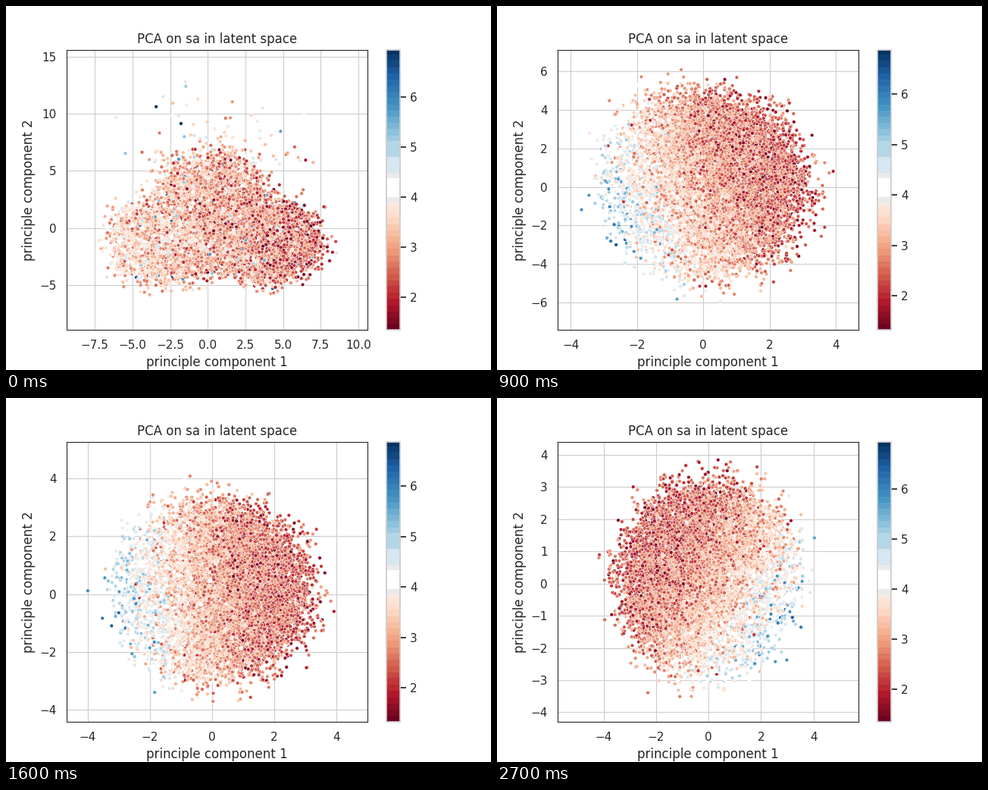
Write a matplotlib script that moves like this. It is 640 px wide and 480 px high and loops after 2.8 s.

```python
import numpy as np
import matplotlib.pyplot as plt
from matplotlib.animation import FuncAnimation
from matplotlib.colors import ListedColormap

FRAMES, INTERVAL = 28, 100
POINTS = 10000
INK = "0.15"

plt.rcParams.update({
    "font.family": "DejaVu Sans",
    "axes.edgecolor": "0.8",
    "axes.linewidth": 1.25,
    "axes.axisbelow": True,
    "axes.labelsize": 12,
    "axes.titlesize": 12,
    "axes.labelcolor": INK,
    "text.color": INK,
    "xtick.color": INK,
    "ytick.color": INK,
    "xtick.labelsize": 11,
    "ytick.labelsize": 11,
    "xtick.major.size": 6,
    "ytick.major.size": 6,
    "xtick.major.width": 1.25,
    "ytick.major.width": 1.25,
})

# Key views: x limits, y limits
LOBED = (-9.37, 10.60, -8.93, 15.62)
STRIP = (-23.56, 23.54, -26.28, 27.48)
ROUND = (-4.39, 4.67, -7.42, 7.12)
VIEWS = {
    0: LOBED, 2: ROUND, 5: STRIP, 9: ROUND, 12: ROUND,
    16: (-4.67, 4.99, -4.43, 5.28),
    20: (-4.70, 5.01, -4.155, 4.40),
    24: (-5.43, 5.93, -4.55, 5.21),
    27: (-5.75, 5.71, -4.30, 4.41),
}
STRIP_AXES = np.array([(2.3, 3.2), (-18.5, 20.5)])


def banded_map():
    """Red-blue map in coarse bands with a wide white middle."""
    base = plt.get_cmap("RdBu")
    colors = []
    for t in (np.arange(512) + 0.5) / 512:
        if 0.474 <= t < 0.542:
            colors.append((1, 1, 1, 1))
        elif 0.452 <= t < 0.561:
            colors.append((0.925, 0.92, 0.915, 1))
        else:
            step = 0.056 if 0.561 <= t < 0.673 else 0.0222
            start = 0.561 if t >= 0.561 else 0
            colors.append(base(start + (np.floor((t - start) / step) + 0.5) * step))
    return ListedColormap(colors)


def disk(rng, n):
    r, phi = np.sqrt(rng.random(n)), rng.uniform(0, 2 * np.pi, n)
    return np.column_stack([r * np.cos(phi), r * np.sin(phi)])


def round_cloud(rng):
    """Unit disk with frayed edge; values fall along the first axis."""
    p = 0.84 * disk(rng, 2 * POINTS) + rng.normal(0, 0.14, (2 * POINTS, 2))
    keep = rng.random(len(p)) < np.exp(-1.9 * np.clip(-p[:, 0] - 0.35, 0, None))
    p = p[keep][:POINTS]
    a = p[:, 0]
    spread = 0.46 + 0.3 * np.clip(-a, 0, 1)
    return p, 2.95 - 1.4 * a + 0.75 * a**2 + spread * rng.normal(0, 1, POINTS)


def lobed_cloud(rng):
    """Merged lobes with stray points above."""
    centers = np.array([(-2.9, -1.2), (3.9, -1.1), (0.3, 2.8), (0.5, -1.0)])
    lobe = rng.choice(4, POINTS, p=[0.32, 0.32, 0.26, 0.10])
    p = centers[lobe] + 3.1 * disk(rng, POINTS) + rng.normal(0, 0.72, (POINTS, 2))
    value = 2.95 - 0.09 * p[:, 0] + rng.normal(0, 0.58, POINTS)
    tail = rng.random(POINTS) < 0.06
    value[tail] += rng.exponential(1.1, tail.sum())
    stray = rng.random(POINTS) < 0.014
    k = stray.sum()
    p[stray] = np.column_stack([rng.normal(0.5, 2.6, k),
                                5.5 + rng.exponential(1.8, k)])
    value[stray] += 0.7
    return p, value


def round_axes(i):
    """Slow turn of the round cloud while it settles in height."""
    t = max(i - 12, 0)
    u = min(t / 12, 1)
    turn = np.radians(20 - 57 * u * u * (3 - 2 * u))
    width, height = 3.3 + 0.02 * t, 3.2 + 1.9 * np.exp(-t / 1.3)
    c, s = np.cos(turn), np.sin(turn)
    return np.array([(c, s), (-s, c)]) * (width, height)


def view(i):
    return [np.interp(i, list(VIEWS), side) for side in zip(*VIEWS.values())]


def value_limits(i):
    dip = np.exp(-((i - 12.5) / 4) ** 2)
    return 1.345 - 0.04 * dip, 6.945 - 0.15 * dip


def signs(i):
    """Component signs switch abruptly between fits."""
    return (1 if 8 <= i < 23 else -1), (1 if 8 <= i < 26 else -1)


rng = np.random.default_rng(11)
disk_pos, disk_val = round_cloud(rng)
lobe_pos, lobe_val = lobed_cloud(rng)

fig, ax = plt.subplots(figsize=(6.4, 4.8), dpi=100, facecolor="white")
dots = ax.scatter(*disk_pos.T, c=disk_val, s=11.5, cmap=banded_map(),
                  edgecolors="white", linewidths=0.35, zorder=2)
ax.set_title("PCA on sa in latent space")
ax.set_xlabel("principle component 1")
ax.set_ylabel("principle component 2")
ax.grid(True, color="0.8", linewidth=0.8)
ax.tick_params(bottom=False, left=False)
for spine in ax.spines.values():
    spine.set(color=INK, linewidth=0.8)
fig.colorbar(dots, ax=ax)


def update(i):
    lobed = np.interp(i, [0, 2], [1, 0])
    strip = np.interp(i, [2, 5, 9], [0, 1, 0])

    # In the strip the value itself orders the points across its width.
    a, b = disk_pos.T
    ordered = 0.5 * a - 0.5 * np.tanh((disk_val - 2.95) / 1.5)
    a = a + strip * (ordered - a)
    axes = strip * STRIP_AXES + (1 - strip) * round_axes(i)
    jitter = np.random.default_rng(100 + i).normal(0, 0.03, (POINTS, 2))
    pos = (np.column_stack([a, b]) + jitter) @ axes * signs(i) + (0, 0.12)

    low, high = value_limits(i)
    value = lobed * lobe_val + (1 - lobed) * disk_val
    dots.set_offsets(lobed * lobe_pos + (1 - lobed) * pos)
    dots.set_array(np.clip(value, low, high))
    dots.set_clim(low, high)
    x0, x1, y0, y1 = view(i)
    ax.set_xlim(x0, x1)
    ax.set_ylim(y0, y1)
    return [dots]


anim = FuncAnimation(fig, update, frames=FRAMES, interval=INTERVAL,
                     repeat=True, repeat_delay=0, blit=False)
plt.show()
```
